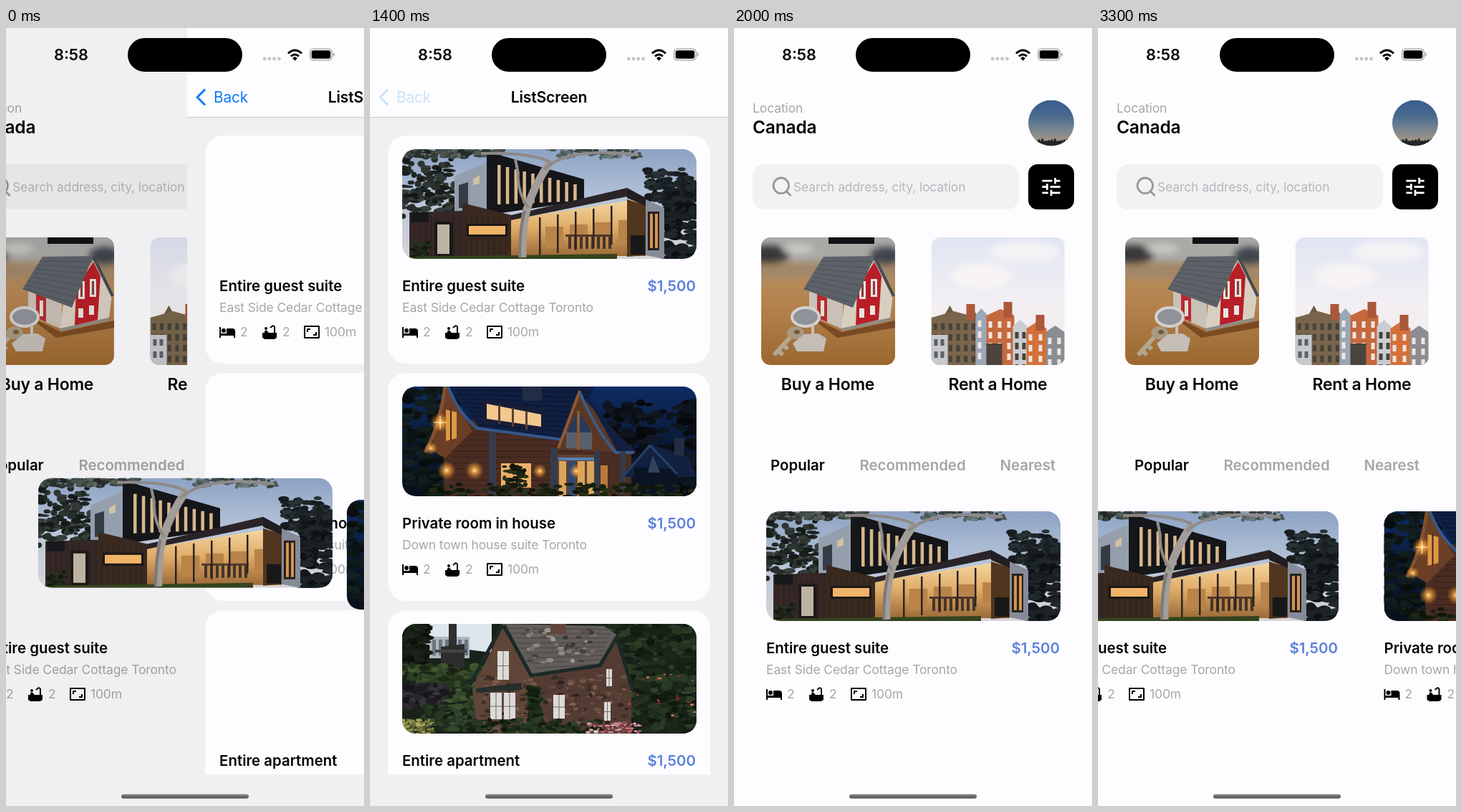
An HTML page for the animation above (3400 ms loop, 500 px wide and 1085 px high).

```html
<!DOCTYPE html>
<html lang="en">
<head>
<meta charset="utf-8">
<title>Home finder</title>
<style>
html, body { margin: 0; width: 100%; height: 100%; overflow: hidden; background: #fdfcfe; }
svg { display: block; width: 100vw; height: 100vh; }
text { font-family: Inter, Roboto, sans-serif; fill: #030303; }
.bold { font-size: 20.4px; font-weight: 600; }
.soft { font-size: 17.5px; letter-spacing: -.12px; fill: #a7a6aa; }
.hint { fill: #b7b6ba; }
.big { font-size: 22.9px; font-weight: 600; letter-spacing: -.2px; }
.city { font-size: 24.5px; font-weight: 600; letter-spacing: -.2px; }
.off { fill: #a6a5a9; }
.price { fill: #5b80dc; }
.nav { font-size: 21.2px; font-weight: 600; letter-spacing: -.2px; }
.back { font-size: 20.8px; letter-spacing: -.2px; fill: #0c7af5; }
.clock { font-size: 21.7px; font-weight: 600; }
</style>
</head>
<body>
<svg id="stage" viewBox="0 0 500 1085" preserveAspectRatio="none"></svg>
<script>
const rect = (x, y, w, h, fill, r = 0) =>
  `<rect x="${x}" y="${y}" width="${w}" height="${h}" rx="${r}" fill="${fill}"/>`;
const poly = (points, fill) => `<polygon points="${points}" fill="${fill}"/>`;
const line = (d, color, w) =>
  `<path d="${d}" fill="none" stroke="${color}" stroke-width="${w}" stroke-linejoin="round"/>`;
const oval = (x, y, rx, ry, fill) => `<ellipse cx="${x}" cy="${y}" rx="${rx}" ry="${ry}" fill="${fill}"/>`;
const text = (x, y, s, cls, anchor = "start") =>
  `<text x="${x}" y="${y}" class="${cls}" text-anchor="${anchor}">${s}</text>`;
const move = (x, y, body) => `<g transform="translate(${x} ${y})">${body}</g>`;
const clipped = (id, body) => `<g clip-path="url(#${id})">${body}</g>`;
const blurred = body => `<g filter="url(#blur)">${body}</g>`;
const repeat = (n, fn) => Array.from({ length: n }, (_, i) => fn(i)).join("");
const fade = (id, ...colors) => `<linearGradient id="${id}" x2="0" y2="1">` +
  colors.map((c, i) => `<stop offset="${i / (colors.length - 1)}" stop-color="${c}"/>`).join("") + "</linearGradient>";
const clip = (id, w, h, r) => `<clipPath id="${id}">${rect(0, 0, w, h, "#000", r)}</clipPath>`;

// Wall with upright sides; top and bottom may slope
const slab = (x, w, topL, topR, botL, botR, fill) =>
  poly(`${x},${topL} ${x + w},${topR} ${x + w},${botR} ${x},${botL}`, fill);
const grid = (x, y, cols, rows, dx, dy, w, h, fill, slope = 0) => repeat(cols * rows, i =>
  rect(x + i % cols * dx, y + Math.floor(i / cols) * dy + i % cols * slope, w, h, fill));

// Seeded specks over a box: leaves, bricks or slates
function specks(seed, n, x, y, w, h, size, hue, sat, light) {
  const rnd = () => (seed = (seed * 16807) % 2147483647) / 2147483647;
  for (let i = 0; i < 5; i++) rnd();
  return repeat(n, () => oval((x + rnd() * w).toFixed(1), (y + rnd() * h).toFixed(1),
    (size * (.5 + rnd())).toFixed(1), (size * (.3 + rnd() * .5)).toFixed(1),
    `hsl(${hue} ${sat}% ${(light * (.5 + rnd())).toFixed(1)}%)`));
}

function modernHouse() {
  return rect(0, 0, 411, 153, "url(#dusk)") +
    specks(7, 150, 0, 14, 74, 80, 6, 150, 8, 16) +
    specks(23, 130, 342, 28, 60, 60, 6, 200, 14, 13) + specks(24, 130, 368, 46, 43, 107, 8, 200, 16, 11) +
    specks(5, 100, 0, 0, 140, 12, 5, 150, 6, 26) + specks(9, 70, 205, 0, 130, 12, 4, 180, 6, 34) +
    slab(73, 45, 38, 18, 88, 92, "#959eac") + slab(79, 13, 50, 46, 82, 82, "#353c45") + slab(99, 9, 42, 36, 50, 48, "#d0c2a4") +
    slab(118, 136, 3, 42, 92, 72, "#15161a") +
    repeat(10, i => rect(133 + i * 11.8, 22 + i * 3, 4.5, 55 - i * 3.5, "#d7b78c")) +
    slab(10, 75, 88, 86, 151, 151, "#352725") + slab(84, 69, 75, 92, 151, 151, "#39291f") +
    grid(16, 94, 17, 1, 8, 0, 1, 57, "#2a1e1d") + rect(12, 88, 25, 14, "#17181c") +
    rect(45, 101, 26, 49, "#1d1919") + rect(49, 105, 17, 41, "#bdb3a0") +
    rect(90, 104, 57, 18, "#1b1717") + rect(93, 107, 51, 12, "#f0b468") +
    slab(152, 188, 98, 68, 149, 149, "url(#warm)") + grid(200, 108, 4, 1, 34, 0, 25, 30, "#b98349", -3) +
    grid(232, 121, 8, 1, 8, 0, 4, 18, "#463428") + rect(228, 119, 66, 3, "#4e392c") +
    grid(191, 95, 6, 1, 25, 0, 2.5, 54, "#2c2422", -4) + slab(314, 26, 70, 78, 150, 148, "#50351f") + rect(319, 120, 20, 27, "#191818") +
    slab(152, 162, 92, 54, 99, 66, "#2a2327") + slab(314, 28, 54, 69, 68, 80, "#211d22") +
    slab(340, 26, 70, 82, 148, 153, "#858b98") + rect(343, 87, 16, 54, "#26201e") + grid(346, 90, 2, 1, 7, 0, 4, 48, "#d2954f") +
    slab(0, 300, 150, 146, 153, 153, "#34441f") +
    line("M168 151Q167 112 174 84Q184 50 208 16", "#a29d99", 11) + line("M164 151Q164 112 171 86", "#7f7974", 4) +
    line("M198 28Q232 -4 330 8M176 82Q160 58 162 34L158 14M206 18Q180 4 110 6", "#8d8a89", 4) +
    specks(31, 40, 14, 130, 26, 20, 4, 100, 20, 12);
}

function nightHouse() {
  const lamp = (x, y, r) => oval(x, y, r, r, "url(#lamp)");
  return rect(0, 0, 411, 153, "url(#night)") +
    specks(3, 150, 0, 0, 78, 153, 8, 180, 25, 7) + specks(17, 230, 285, 22, 126, 131, 8, 218, 35, 7) +
    slab(58, 262, 40, 82, 153, 153, "#4a2c22") + grid(70, 66, 1, 11, 0, 8, 180, 1, "#341f19") +
    poly("62,0 98,62 60,100 40,88", "#6b3f26") + slab(61, 15, 32, 36, 76, 72, "#dd9844") + rect(67, 31, 2, 44, "#40251b") +
    poly("62,0 268,0 240,76 108,57", "#101f42") +
    repeat(10, i => line(`M${74 + i * 4} ${5 + i * 6}L${262 - i * 3} ${8 + i * 7}`, "#0a1732", 1.5)) +
    rect(168, 0, 27, 20, "#222c45") + slab(112, 90, 17, 33, 51, 62, "#161d36") + slab(118, 76, 24, 39, 45, 56, "#f3c78e") +
    grid(134, 26, 3, 1, 19, 0, 3, 26, "#5c4030", 4) +
    line("M60 0Q52 56 32 92", "#82502d", 5) + line("M64 0Q78 36 104 58L238 76", "#34578a", 4) +
    poly("246,10 216,88 326,92", "#5b3723") + slab(229, 36, 62, 62, 86, 88, "#5a5f6c") + poly("246,32 230,64 264,64", "#263a5d") +
    line("M246 34V88M248 6L218 86", "#8f5932", 4) +
    poly("250,0 292,58 326,90 300,90", "#101f42") + line("M248 8Q270 60 298 92H324", "#3b5a89", 4) +
    rect(216, 95, 56, 58, "#604330") + grid(219, 104, 4, 1, 13, 0, 10, 49, "#d9a55d") + rect(232, 104, 10, 49, "#31496f") +
    rect(218, 99, 52, 4, "#577fb4") + rect(138, 107, 42, 34, "#eeb069") + rect(277, 110, 10, 38, "#b97a3f") +
    grid(121, 64, 2, 1, 86, 0, 10, 88, "#363b4b", 22) + grid(268, 90, 2, 1, 36, 0, 8, 60, "#363b4b") +
    poly("306,126 346,80 400,98 411,126", "#122140") + slab(324, 60, 112, 116, 153, 153, "#0b1424") + rect(380, 72, 14, 24, "#222d44") +
    poly("350,96 360,120 343,120", "#33425d") + line("M308 126L346 82L384 122", "#25406a", 3) +
    specks(77, 130, 30, 136, 381, 18, 5, 90, 32, 10) + specks(47, 60, 142, 110, 32, 40, 4, 90, 28, 11) +
    lamp(53, 50, 14) + lamp(40, 86, 9) + repeat(2, i => lamp(62 + i * 39, 117, 13) + lamp(192 + i * 51, 118, 10)) +
    line("M53 41V59M44 50H62", "#fff0bd", 1.2);
}

function stoneCottage() {
  const pane = (x, y, w, h) => rect(x, y, w, h, "#dcdbda") + rect(x + w / 2 - .5, y, 1, h, "#766e69") + rect(x, y + h / 2, w, 1, "#766e69");
  return rect(0, 0, 411, 153, "#18221a") + slab(28, 97, 0, 0, 28, 40, "#dfe5ec") +
    rect(38, 18, 56, 30, "#aeb6bf") + grid(42, 22, 6, 1, 9, 0, 5, 22, "#6b7580") +
    specks(13, 110, 0, 0, 36, 54, 6, 110, 18, 9) +
    slab(65, 11, 0, 0, 40, 40, "#30302f") + slab(54, 33, 32, 28, 62, 62, "#2c2d2c") + rect(46, 36, 44, 4, "#454644") +
    specks(27, 220, 0, 58, 110, 50, 6, 100, 28, 19) + specks(29, 150, 0, 84, 60, 34, 6, 270, 7, 15) +
    specks(33, 130, 30, 112, 80, 36, 6, 105, 25, 17) + specks(37, 90, 0, 134, 44, 19, 3, 62, 32, 38) +
    specks(53, 420, 282, 0, 129, 153, 7, 105, 24, 14) +
    poly("140,6 182,70 190,153 104,153 98,90", "#604539") + poly("178,70 278,54 298,22 320,94 320,153 188,153", "#543c33") +
    specks(59, 260, 108, 72, 206, 78, 4, 18, 22, 28) +
    poly("138,0 282,3 302,17 276,57 180,72", "#625d5a") +
    repeat(9, i => line(`M${146 + i * 5} ${6 + i * 7}L${292 - i * 2} ${8 + i * 6}`, "#504b49", 1.5)) +
    specks(60, 60, 172, 6, 95, 48, 4, 25, 5, 40) +
    line("M140 1L94 86M142 2L180 72L276 58L300 18L322 92", "#1b2a26", 5) + rect(207, 0, 22, 14, "#634639") +
    slab(103, 64, 90, 82, 96, 92, "#252f2c") +
    pane(133, 38, 16, 40) + pane(123, 96, 16, 37) + pane(142, 96, 16, 37) + pane(211, 99, 16, 33) + pane(285, 63, 8, 24) + pane(282, 109, 9, 26) +
    specks(61, 90, 178, 88, 16, 65, 5, 110, 28, 13) + specks(67, 140, 92, 134, 185, 20, 5, 105, 26, 14) +
    specks(71, 80, 258, 138, 76, 14, 2.4, 350, 40, 62) + specks(73, 26, 314, 68, 95, 60, 2, 5, 55, 45);
}

const woods = () => rect(0, 0, 411, 153, "url(#night)") + specks(83, 260, 0, 8, 411, 145, 11, 195, 32, 11);

function toyHouse() {
  return rect(0, 0, 187, 178, "url(#wood)") + rect(0, 0, 187, 42, "#aaa9a6") + rect(94, 0, 64, 9, "#111214") +
    blurred(rect(-10, 34, 210, 24, "#a38768") + oval(10, 24, 30, 13, "#39393b") + oval(52, 16, 22, 7, "#cac8c3") + oval(174, 26, 22, 13, "#41454d")) +
    poly("64,108 113,132 187,116 187,126 106,140", "#7a4b23") +
    slab(67, 47, 74, 92, 108, 128, "#c9c1b7") + slab(78, 14, 78, 84, 112, 118, "#b62a30") + rect(83, 88, 5, 22, "#e2ddd5") +
    poly("158,32 184,80 180,112 112,128 116,92", "#d9cfc1") + poly("134,72 158,34 168,54 164,115 132,123", "#b81f28") +
    grid(137, 61, 2, 1, 16, 0, 9, 25, "#e9e4de", -3) + grid(140, 64, 2, 1, 16, 0, 3, 19, "#8a3a3e", -3) + grid(137, 99, 2, 1, 15, 0, 7, 13, "#e9e4de", -4) +
    line("M112 129L180 114", "#8e8c88", 4) + poly("87,27 158,26 128,98 59,72", "#5d6269") +
    repeat(8, i => line(`M${84 - i * 3.4} ${33 + i * 5.5}L${155 - i * 3.7} ${34 + i * 8.2}`, "#4c5158", 1)) +
    line("M158 27L185 82", "#464b53", 4) +
    `<ellipse cx="62" cy="111" rx="19" ry="13" fill="#8f9299" stroke="#d4d1ce" stroke-width="4"/>` +
    line("M18 164L46 133M24 158L30 164M31 150L37 156", "#b2a78f", 6) + oval(48, 133, 12, 9, "#a69a83") + oval(50, 132, 4, 3, "#755a36") +
    line("M72 122V138", "#c6c2bd", 4) + poly("44,148 60,135 80,134 91,141 87,159 50,159", "#c4beb7");
}

function terrace() {
  // Left edge, width, roof height, colour
  const row = [[0, 64, 112, "#78654b"], [62, 16, 108, "#9ba7b6"], [77, 39, 109, "#c5683e"],
    [114, 20, 124, "#c9cdd3"], [133, 28, 127, "#d57038"], [160, 26, 132, "#8b8d92"]];
  return rect(0, 0, 186, 178, "url(#pale)") + blurred(oval(70, 54, 42, 18, "#f8f4f5") + oval(130, 20, 50, 14, "#f6f3f6")) +
    repeat(2, i => poly(`${12 + i * 30},120 ${26 + i * 30},95 ${40 + i * 30},120`, "#6c5a46")) +
    row.map(([x, w, top, color], i) => {
      const cols = Math.floor(w / 10);
      return poly(`${x},${top} ${x + w / 2},${top - 9} ${x + w},${top} ${x + w},178 ${x},178`, color) +
        (i % 2 ? "" : rect(x + w - 15, top - 19, 12, 22, "#ab573a")) +
        grid(x + 3, top + 8, cols, 4, w / cols, 15, 5, 9, i % 3 ? "#eee6df" : "#47423c");
    }).join("") + rect(0, 136, 23, 42, "#c7c9cc") + grid(4, 142, 2, 2, 9, 17, 5, 9, "#5b626b") + rect(77, 148, 22, 30, "#4b443e");
}

const icon = (x, y, body) => move(x, y, body);
const bed = x => icon(x, 243, oval(7, 10, 3, 3, "#000") + `<path d="M1 5h2v9h8V7h8a4 4 0 0 1 4 4v9h-2v-3H3v3H1z"/>`);
const bath = x => icon(x, 243, oval(7, 7, 2, 2, "#000") + line("M19 14V5a2 2 0 0 0-3.5-1L13 6", "#000", 2) +
  `<path d="M5 13v-1a2 2 0 0 1 4-1l2 2h11v6a2 2 0 0 1-2 2l-1 1H5l-1-1a2 2 0 0 1-2-2v-6z"/>`);
const area = x => icon(x, 243, line("M2 4H22V20H2zM6 12V8H10M18 12V16H14", "#000", 2));

const homes = [
  ["Entire guest suite", "East Side Cedar Cottage Toronto", modernHouse],
  ["Private room in house", "Down town house suite Toronto", nightHouse],
  ["Entire apartment", "Garden lane stone suite Toronto", stoneCottage],
  ["Entire guest suite", "East Side Cedar Cottage Toronto", woods]
];
const GAP = 474.5, ROW = 331, LIST_Y = 169, HOME_Y = 674;

// Caption placed relative to the top left corner of its photo
const caption = ([name, place]) =>
  text(0, 198, name, "bold") + text(410, 198, "$1,500", "bold price", "end") + text(0, 226.5, place, "soft") +
  bed(-1) + text(29, 261, "2", "soft") + bath(58) + text(88, 261, "2", "soft") + area(117) + text(147, 261, "100m", "soft");

const defs = "<defs>" + fade("dusk", "#8da3c4", "#b9c6d9", "#d8d5d8") + fade("night", "#0d2c64", "#0b1a39", "#080f1b") +
  fade("warm", "#f5d9a6", "#e0ad68", "#9c6a38") + fade("wood", "#b99568", "#b58450", "#9b672f") + fade("pale", "#dfe5f2", "#f2eff3", "#f4ebe6") +
  fade("sky", "#385d8f", "#48698f", "#7c8791", "#b99a78") + fade("bar", "#8c8c8e", "#4c4c4e") +
  `<radialGradient id="lamp"><stop stop-color="#fff0b8"/><stop offset=".25" stop-color="#ffb64d" stop-opacity=".8"/><stop offset="1" stop-color="#f08a20" stop-opacity="0"/></radialGradient>` +
  `<filter id="blur"><feGaussianBlur stdDeviation="5"/></filter>` +
  clip("wide", 411, 153, 19) + clip("tile", 187, 178, 13) + clip("face", 64, 64, 32) + clip("safe", 500, 1041, 0) + "</defs>";

const tile = (x, art, label) => move(x, 292, clipped("tile", art()) + text(93, 213, label, "big", "middle"));

const homeScreen = rect(0, 0, 660, 1085, "#fdfcfe") + text(26, 118, "Location", "soft") + text(26, 147, "Canada", "city") +
  move(411, 100.5, clipped("face", rect(0, 0, 64, 64, "url(#sky)") + rect(0, 57, 64, 8, "#252a2e") +
    repeat(13, i => rect(5 + i * 4.4, 57 - (i * 5) % 4, 3, 6, "#1d2226")))) +
  rect(26, 190, 372, 63, "#f2f1f3", 16) + text(83, 227.5, "Search address, city, location", "soft hint") +
  line("M55 219.8a10.8 10.8 0 1 0 21.6 0a10.8 10.8 0 1 0-21.6 0M73.5 228L79.5 234", "#98979b", 2.8) +
  rect(411, 190, 64, 63, "#000", 13) +
  `<g transform="translate(426.2 204.7) scale(1.4)">${line("M3 6h10M15 6h6M16 3v6M3 12h6M11 12h10M8 9v6M3 18h6M11 18h10M12 15v6", "#fff", 2)}</g>` +
  tile(38, toyHouse, "Buy a Home") + tile(275.5, terrace, "Rent a Home") +
  text(51, 617, "Popular", "bold") + text(175.5, 617, "Recommended", "bold off") + text(371.5, 617, "Nearest", "bold off") +
  `<g id="row">${homes.map((h, i) => move(45 + GAP * i, HOME_Y, caption(h))).join("")}</g>`;

const listScreen = rect(0, 0, 500, 1085, "#f0eff1") +
  clipped("safe", homes.map((h, i) =>
    rect(25, 150 + ROW * i, 450, 318, "#fdfcfe", 25) + move(45, LIST_Y + ROW * i, caption(h))).join("")) +
  rect(0, 0, 500, 124, "#fdfcfe") + rect(0, 124, 500, 1, "#c9c8cc") +
  `<g id="back">${line("M25 85.5L14 96.5L25 107.5", "#0c7af5", 3)}${text(37, 104, "Back", "back")}</g>` +
  text(250, 104, "ListScreen", "nav", "middle");

const statusBar = text(91, 45.3, "8:58", "clock", "middle") + rect(170, 14, 160, 47, "#000", 23.5) +
  repeat(4, i => oval(361.3 + i * 6.7, 43, 2.4, 2.4, "#c5c4c8")) +
  line("M394 35.5Q403.5 26.5 413 35.5M398 39.5Q403.5 34.5 409 39.5", "#000", 3) + poly("400,42 403.5,40 407,42 403.5,45.8", "#000") +
  rect(424, 28.5, 32, 17, "#a3a2a6", 5.5) + rect(425.3, 29.8, 29.4, 14.4, "#fdfcfe", 4.4) +
  rect(426.7, 31.2, 26.6, 11.6, "#000", 3.2) + rect(456.8, 34.5, 1.8, 5, "#a3a2a6", 1) +
  rect(161, 1068.5, 178, 6, "url(#bar)", 3);

const stage = document.getElementById("stage");
stage.innerHTML = defs + `<g id="home">${homeScreen}</g><rect id="dim" width="500" height="1085"/><g id="list">${listScreen}</g>` +
  homes.map((h, i) => `<g id="photo${i}">${clipped("wide", h[2]())}</g>`).join("") + statusBar;

const LOOP = 3400, STEP = 100, PUSH = -107, POP = 1400;
const get = id => document.getElementById(id);
const place = (id, x, y = 0) => get(id).setAttribute("transform", `translate(${x.toFixed(2)} ${y.toFixed(2)})`);
const clamp = v => Math.min(1, Math.max(0, v));
const spring = ms => { const k = Math.max(0, ms) * .0155; return 1 - (1 + k) * Math.exp(-k); };
const inOut = ms => { const u = clamp(ms / 500); return u < .5 ? 2 * u * u : 1 - 2 * (1 - u) ** 2; };

function draw(t) {
  // 0 = home, 1 = list
  const popping = t >= POP;
  const age = t - (popping ? POP : PUSH);
  const slide = age >= 600 ? 1 : spring(age);
  const screen = popping ? 1 - slide : slide;
  const flight = popping ? 1 - inOut(age - 11) : inOut(age);
  const scroll = t < 2700 ? 0 : -308 * Math.sin(.00395 * (t - 2606));
  place("home", -150 * screen);
  place("row", scroll);
  place("list", 500 * (1 - screen));
  get("dim").setAttribute("opacity", .1 * screen);
  get("back").setAttribute("opacity", popping ? .2 + .8 * clamp(age / 230) : 1);
  homes.forEach((_, i) => {
    const x = 45 + GAP * i + scroll, y = LIST_Y + ROW * i;
    place("photo" + i, x + (45 - x) * flight, HOME_Y + (y - HOME_Y) * flight);
  });
}

const start = performance.now();
let shown = -1;
function tick() {
  const t = Math.floor((performance.now() - start) % LOOP / STEP) * STEP;
  if (t !== shown) draw(shown = t);
  requestAnimationFrame(tick);
}
tick();
</script>
</body>
</html>
```
